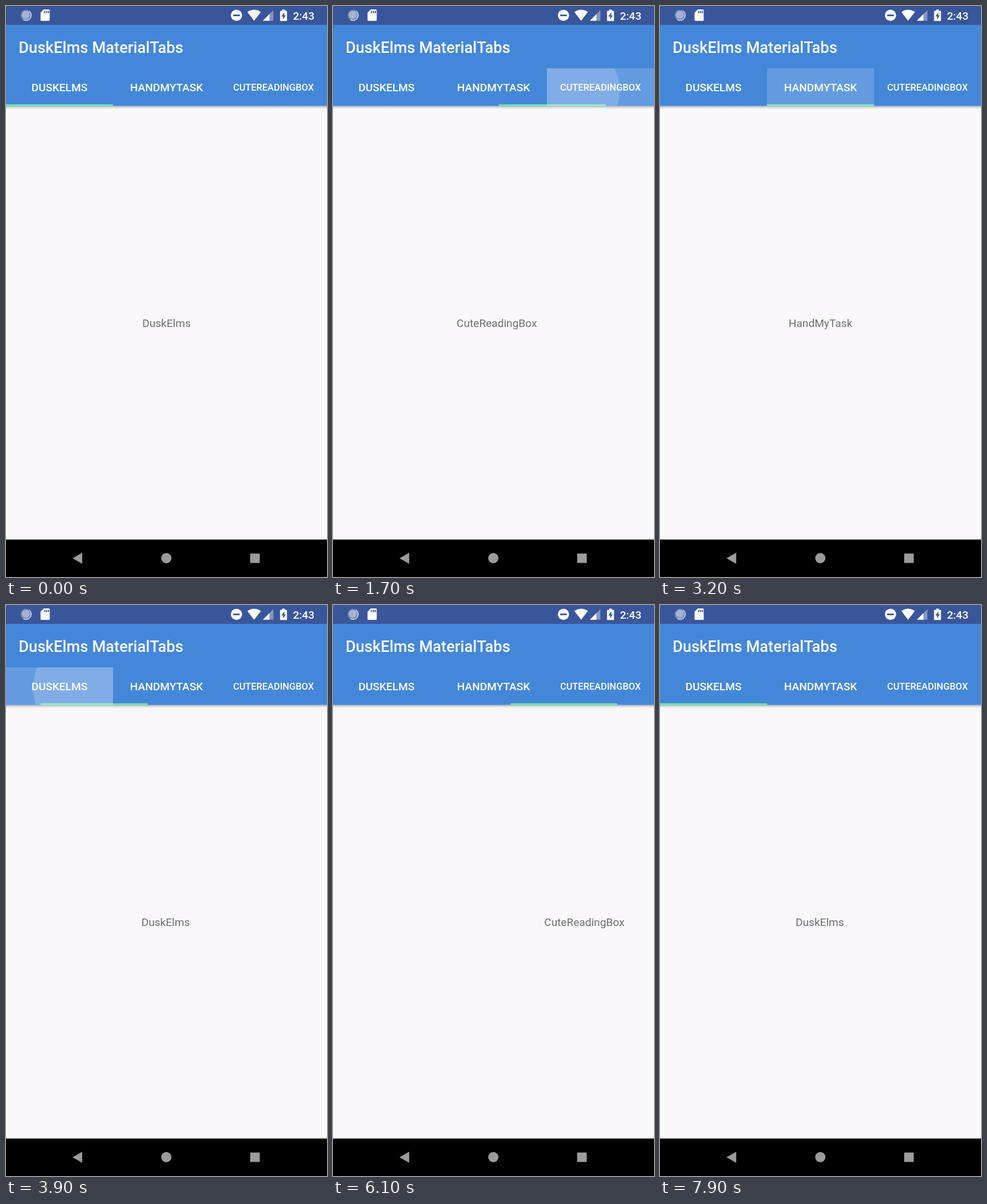
An HTML page that plays this animation: 561 by 998 pixels, repeating every 8000 ms.

```html
<!DOCTYPE html>
<html lang="en">
<head>
<meta charset="utf-8">
<title>Material tabs</title>
<style>
  html, body { margin: 0; width: 100%; height: 100%; overflow: hidden; background: #faf8fb; }
  svg { display: block; width: 100vw; height: 100vh; font-family: Roboto, sans-serif; }
  .tab { font-size: 19.1px; font-weight: 500; fill: #fff; text-anchor: middle; }
  .page { font-size: 19.1px; fill: #6e6d70; text-anchor: middle; }
</style>
</head>
<body>
<svg viewBox="0 0 561 998">
  <defs>
    <linearGradient id="shade" x1="0" y1="0" x2="0" y2="1">
      <stop offset="0" stop-color="#000" stop-opacity=".3"/>
      <stop offset=".4" stop-color="#000" stop-opacity=".12"/>
      <stop offset="1" stop-color="#000" stop-opacity="0"/>
    </linearGradient>
    <clipPath id="tabClip"><rect id="clipBox" y="109" width="187" height="65.7"/></clipPath>
  </defs>

  <rect width="561" height="998" fill="#faf8fb"/>
  <g id="pages"></g>

  <!-- app bar -->
  <rect y="174.7" width="561" height="6" fill="url(#shade)"/>
  <rect y="33" width="561" height="141.7" fill="#4487d9"/>
  <text x="22" y="81.5" font-size="27.3" font-weight="500" fill="#fff">DuskElms MaterialTabs</text>
  <rect id="indicator" y="171.9" width="187" height="2.8" fill="#69f0ae"/>
  <g id="ripple" clip-path="url(#tabClip)" fill="#fff">
    <rect id="glow" y="109" width="187" height="65.7"/>
    <circle id="wave"/>
  </g>
  <g id="tabs"></g>

  <!-- status bar -->
  <rect width="561" height="33" fill="#3a569b"/>
  <g fill="#fff">
    <circle cx="34.8" cy="15.8" r="7" opacity=".55"/>
    <circle cx="35.2" cy="16.2" r="8.2" fill="none" stroke="#fff" stroke-width="2.6" stroke-dasharray="1.2 .9" opacity=".5"/>
    <path d="M40.5 9A9 9 0 0 1 30 23.6" fill="none" stroke="#fff" stroke-width="2" stroke-dasharray="1.4 .7" opacity=".8"/>
    <path d="M66 6.1H74.8Q76.4 6.1 76.4 7.8V24.4Q76.4 26 74.8 26H62Q60.4 26 60.4 24.4V11.8Z"/>
    <path d="M66.4 8.6h2v4h-2zM69.8 8.6h2v4h-2zM73.1 8.6h2v4h-2z" fill="#3a569b"/>
    <circle cx="402.8" cy="16.3" r="9.8"/>
    <rect x="397" y="14.9" width="11.6" height="2.9" fill="#3a569b"/>
    <path d="M421.8 10.6Q433.6 2.6 445.5 10.6L433.6 25.8Z"/>
    <path d="M467.3 7.2V25.8H448.9Z" opacity=".38"/>
    <path d="M460.4 14.2V25.8H448.9Z"/>
    <path d="M482.6 6.2h4.8v2.2h2.4q1.3 0 1.3 1.3v15.2q0 1.3-1.3 1.3h-9.6q-1.3 0-1.3-1.3V9.7q0-1.3 1.3-1.3h2.4z"/>
    <path d="M486.3 11.2L481.3 18.2H484.3V23.6L489 16.4H486.3Z" fill="#3a569b"/>
    <text x="539" y="23.6" font-size="19.1" font-weight="500" text-anchor="end">2:43</text>
  </g>

  <!-- navigation bar -->
  <rect y="932.5" width="561" height="65.5" fill="#000"/>
  <g fill="#9b9b9b">
    <path d="M116.3 965.2L133.2 955.4V975Z"/>
    <circle cx="280.2" cy="965" r="9"/>
    <rect x="426.7" y="957" width="16.8" height="16.4" rx="1"/>
  </g>
</svg>
<script>
const LOOP = 8000, STEP = 100, W = 561, TAB = 187;
const NAMES = ["DuskElms", "HandMyTask", "CuteReadingBox"];

// Taps: start is when the pager begins to scroll, x/y is where the ripple sits.
// Drags: path is the page progress at each step.
const MOVES = [
  { at: 500, from: 0, to: 1, start: 475, x: 280, y: 145 },
  { at: 1600, from: 1, to: 2, start: 1580, x: 418, y: 147 },
  { at: 2900, from: 2, to: 1, start: 2875, x: 280, y: 145 },
  { at: 3800, from: 1, to: 0, start: 3761, x: 130, y: 145 },
  { at: 5100, from: 0, to: 1, path: [.05, .33, .784, .967, .996, 1] },
  { at: 5900, from: 1, to: 2, path: [.04, .207, .717, .93, .985, .997, 1] },
  { at: 6900, from: 2, to: 1, path: [.25, .888, .985, 1] },
  { at: 7700, from: 1, to: 0, path: [.43, .95, .998] }
];

const $ = id => document.getElementById(id);
const clamp = v => Math.min(1, Math.max(0, v));
const lerp = (a, b, p) => a + (b - a) * p;

function set(el, attrs) {
  for (const key in attrs) el.setAttribute(key, attrs[key]);
}

function addText(parent, text, attrs) {
  const el = document.createElementNS("http://www.w3.org/2000/svg", "text");
  el.textContent = text;
  set(el, attrs);
  return parent.appendChild(el);
}

NAMES.forEach((name, i) => {
  const label = addText($("tabs"), name.toUpperCase(),
    { class: "tab", x: TAB * (i + .5), y: i === 2 ? 148 : 149.2 });
  if (i === 2) label.style.fontSize = "16.4px";
});
const pages = NAMES.map(name => addText($("pages"), name, { class: "page", y: 560.8 }));

const quintOut = p => 1 - (1 - clamp(p)) ** 5;

// cubic-bezier(.4, 0, .2, 1)
function fastOutSlowIn(p) {
  p = clamp(p);
  let lo = 0, hi = 1;
  for (let i = 0; i < 24; i++) {
    const s = (lo + hi) / 2, r = 1 - s;
    if (1.2 * r * r * s + .6 * r * s * s + s ** 3 < p) lo = s; else hi = s;
  }
  return lo * lo * (3 - 2 * lo);
}

function progress(move, t) {
  if (move.path) {
    const k = Math.min(move.path.length - 1, (t - move.at) / STEP);
    const page = move.path[k];
    return { page, bar: clamp(1 - 1.21 * (1 - page)) };
  }
  const e = t - move.start;
  return { page: quintOut(e / 200), bar: fastOutSlowIn((e - 9) / 300) };
}

function drawRipple(move, t) {
  const k = move && !move.path ? (t - move.at) / STEP : 6;
  $("ripple").style.display = k < 6 ? "" : "none";
  if (k >= 6) return;
  const x = move.to * TAB;
  set($("clipBox"), { x });
  set($("glow"), { x, opacity: .17 * clamp((6 - k) / 3) });
  set($("wave"), { cx: move.x, cy: move.y, r: 50 + 33 * k, opacity: .18 * clamp((3 - k) / 2) });
}

function draw(ms) {
  const t = Math.floor((ms % LOOP) / STEP) * STEP;
  const move = MOVES.filter(m => m.at <= t).pop();
  let page = 0, bar = 0;
  if (move) {
    const p = progress(move, t);
    page = lerp(move.from, move.to, p.page);
    bar = lerp(move.from, move.to, p.bar);
  }
  pages.forEach((el, i) => set(el, { x: W / 2 + (i - page) * W }));
  set($("indicator"), { x: bar * TAB });
  drawRipple(move, t);
}

const begin = performance.now();
function tick() {
  draw(performance.now() - begin);
  requestAnimationFrame(tick);
}
tick();
</script>
</body>
</html>
```
